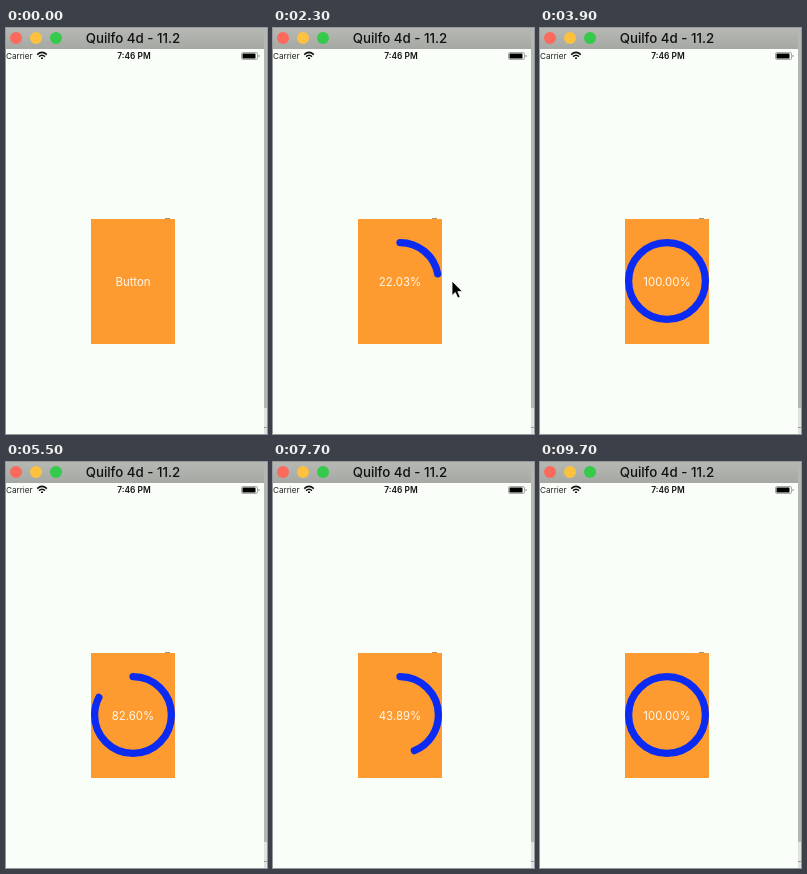
Write an HTML page that moves like this. It is 261 px wide and 406 px high and loops after 9.9 s.

```html
<!DOCTYPE html>
<html lang="en">
<head>
<meta charset="utf-8">
<title>Progress button</title>
<style>
  html, body { margin: 0; width: 100%; height: 100%; overflow: hidden; }
  svg { display: block; width: 261px; height: 406px; font-family: Inter, "Liberation Sans", sans-serif; }
  text { text-anchor: middle; }
</style>
</head>
<body>
<svg viewBox="0 0 261 406">
  <defs>
    <linearGradient id="bar" x2="0" y2="1">
      <stop stop-color="#b6b8b4"/><stop offset="1" stop-color="#a5a8a3"/>
    </linearGradient>
  </defs>

  <rect width="261" height="406" fill="#f9fef8"/>
  <rect x="258" width="3" height="380" fill="#b4b7b3"/>
  <rect x="258" y="380" width="3" height="26" fill="#e0e3df"/>
  <path d="M258 399.5h3" stroke="#999"/>

  <rect width="258" height="21" fill="url(#bar)"/>
  <circle cx="10" cy="10" r="6" fill="#fc6a5d"/>
  <circle cx="30" cy="10" r="6" fill="#fdc140"/>
  <circle cx="50" cy="10" r="6" fill="#35ca4b"/>
  <text x="127" y="14.7" font-size="13.3" font-weight="500" fill="#111">Quilfo 4d - 11.2</text>

  <text x="13.3" y="31" font-size="8.2" fill="#222">Carrier</text>
  <g fill="none" stroke="#111" stroke-width="1.5">
    <path d="M31.2 26.6q4.8-4.4 9.6 0M33 28.6q3-2.8 6 0"/>
    <path d="M35 30.3h2"/>
  </g>
  <text x="128" y="31" font-size="8.4" font-weight="600" fill="#111">7:46 PM</text>
  <rect x="235.5" y="24.5" width="16" height="7" rx="1.5" fill="none" stroke="#888" stroke-width=".7"/>
  <rect x="236.5" y="25.5" width="13" height="5" rx=".6"/>
  <path d="M253 27v2" stroke="#888"/>

  <rect x="85" y="191" width="84" height="125" fill="#fe9b30"/>
  <path d="M159 190.5h5" stroke="#a87334" stroke-width=".8"/>
  <circle id="ring" cx="127" cy="253" r="38.4" pathLength="100" transform="rotate(-90 127 253)"
    fill="none" stroke="#0b2bf3" stroke-width="7.3" stroke-linecap="round"/>
  <text id="label" x="127" y="258" font-size="11.4" fill="#fff7ea"></text>

  <path id="cursor" d="M0 0V14.5L3.3 11.5 5.8 17 8.2 16 5.8 10.6H10.4Z" stroke="#fff" stroke-width=".8"/>
</svg>

<script>
const LOOP = 9900, STEP = 100, BOTTOM = 410;
const RATE = 0.055064; // percent per ms
const runs = [1900, 4000, 6903];

// The pointer rises from below, may slide sideways by shift, waits and drops away
const visits = [
  { arrive: 1100, leave: 2700, x: 160, y: 253, shift: 19 },
  { arrive: 6500, leave: 6600, x: 125, y: 305, shift: 0 }
];

const [ring, label, cursor] = ["ring", "label", "cursor"].map(id => document.getElementById(id));
const ramp = (t, start, length) => Math.min(1, Math.max(0, (t - start) / length));
const easeOut = k => 1 - (1 - k) ** 3;

function pointerAt(t) {
  const { arrive, leave, x, y, shift } = visits.find(v => t < v.leave + 1000) || visits[1];
  const rise = easeOut(ramp(t, arrive - 400, 400));
  const nudge = ramp(t, arrive, 300);
  const exit = ramp(t, leave, 1000);
  const away = 1 - rise + exit ** 1.6;
  return [x + shift * (nudge + easeOut(exit)), y + (BOTTOM - y) * away];
}

function render(t) {
  const start = runs.filter(s => s <= t).pop();
  const running = start !== undefined;
  const percent = running ? Math.min(100, (t - start) * RATE) : 0;
  ring.style.display = running ? "" : "none";
  ring.setAttribute("stroke-dasharray", percent < 100 ? `${percent} 200` : "none");
  label.textContent = running ? percent.toFixed(2) + "%" : "Button";
  cursor.setAttribute("transform", `translate(${pointerAt(t)})`);
}

function tick() {
  render(Math.floor(performance.now() % LOOP / STEP) * STEP);
  requestAnimationFrame(tick);
}
tick();
</script>
</body>
</html>
```
